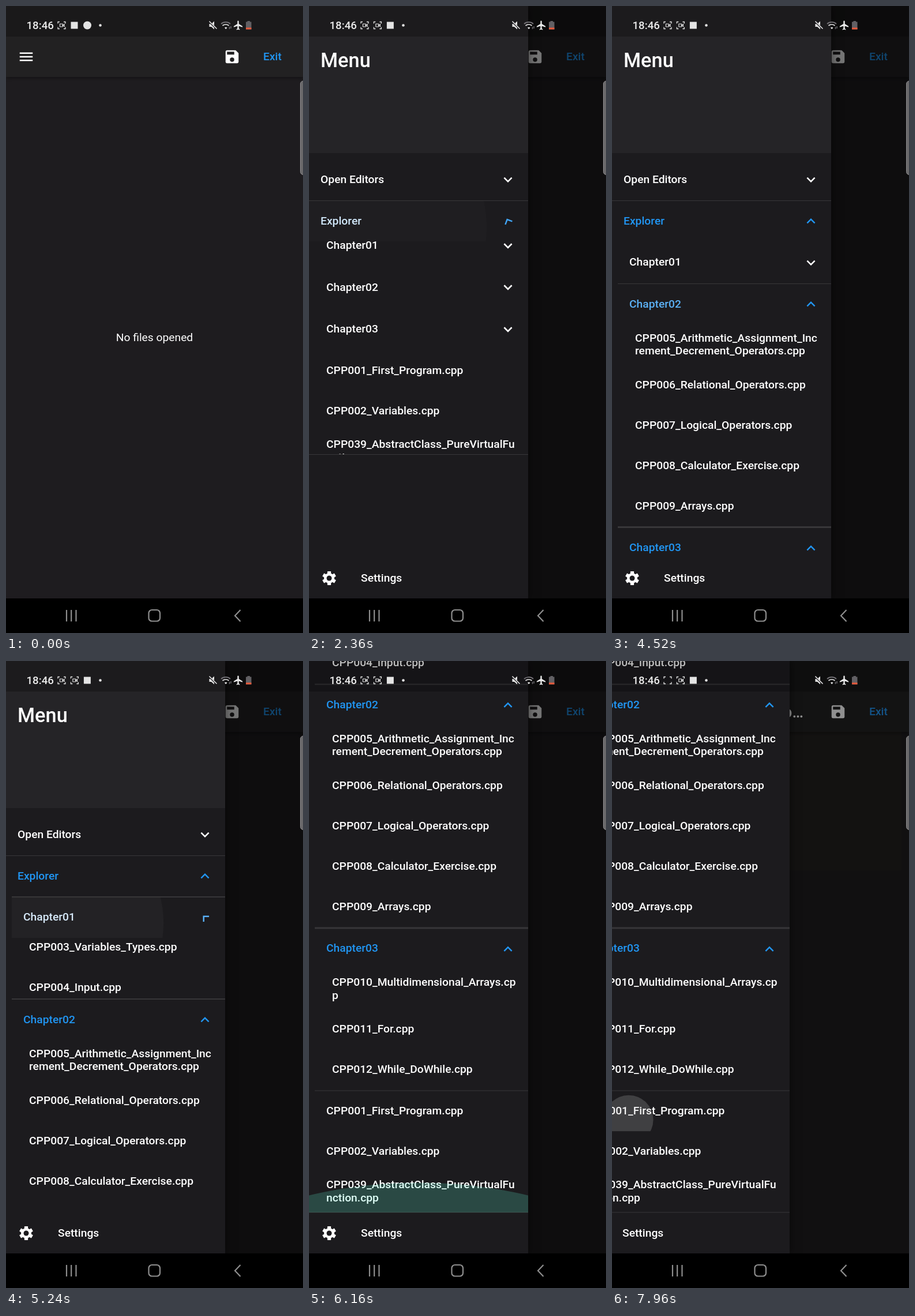
Write an HTML page that moves like this. It is 515x1087 px and loops after 8 s.

```html
<!DOCTYPE html>
<html lang="en">
<head>
<meta charset="utf-8">
<title>File drawer</title>
<style>
html, body { margin: 0; width: 100%; height: 100%; overflow: hidden; background: #000; }
#stage {
  position: relative; width: 515px; height: 1087px; overflow: hidden;
  background: #1e1c1f; color: #fff;
  font: 500 19.25px/22.5px Roboto, sans-serif; white-space: nowrap;
}
#stage div, #stage > svg { position: absolute; }
#stage svg { display: block; }
.icon { width: 30px; height: 30px; fill: currentColor; }

#bar { left: 0; top: 0; width: 515px; height: 123px; background: #222122; box-shadow: 0 2px 6px rgba(0,0,0,.4); }
#bar .icon { position: absolute; top: 73px; }
#exit { left: 446px; top: 77px; color: #2196f3; }
#title { left: 90px; top: 72px; font-size: 27.5px; line-height: 33px; }
#empty { left: 0; width: 515px; top: 564px; text-align: center; font-weight: 400; }
#editor { left: 0; top: 123px; width: 502px; height: 240px; background: #22201e; }
#scrim { left: 0; top: 0; width: 515px; height: 1027px; background: #000; }

#drawer { left: 0; top: 0; width: 380px; height: 1027px; background: #1c1b1e; box-shadow: 0 0 16px rgba(0,0,0,.5); }
#view { left: 0; top: 0; width: 380px; height: 956.5px; overflow: hidden; }
#list { left: 0; top: 0; width: 380px; }
#stage #list div { position: relative; }
#stage #list .head { height: 254.6px; margin-bottom: 10px; background: #252427; }
#stage #list .menu { top: 73.5px; left: 20px; font-size: 34.375px; line-height: 40px; }
#list .row { height: 70px; padding: 0 20px; box-sizing: border-box; overflow: hidden; display: flex; align-items: center; justify-content: space-between; }
#list .line { height: 1.25px; background: rgba(255,255,255,.12); opacity: 0; }
#list .clip { overflow: hidden; }
#list .kids { margin-left: 10px; display: flow-root; }
#stage #list .splash { position: absolute; inset: 0; background: #ccc; opacity: 0; }
#glow { left: 0; bottom: 0; width: 380px; height: 76.4px; overflow: hidden; transform-origin: 50% 100%; }
#glow div { left: -380px; top: 0; width: 1140px; height: 1140px; border-radius: 50%; background: #64ffda; }
#settings { left: 20px; top: 957px; height: 70px; display: flex; align-items: center; gap: 40px; }
#system { left: 0; top: 0; }
</style>
</head>
<body>
<div id="stage">
  <div id="editor"></div>
  <div id="empty">No files opened</div>
  <div id="bar">
    <svg class="icon" style="left:20px" viewBox="0 0 24 24"><path d="M3 18h18v-2H3zM3 13h18v-2H3zM3 6v2h18V6z"/></svg>
    <div id="title">CPP001_First_Pro…</div>
    <svg class="icon" style="left:377px" viewBox="0 0 24 24"><path d="M17 3H5c-1.1 0-2 .9-2 2v14c0 1.1.9 2 2 2h14c1.1 0 2-.9 2-2V7zM12 19a3 3 0 1 1 0-6 3 3 0 0 1 0 6zM15 9H5V5h10z"/></svg>
    <div id="exit">Exit</div>
  </div>
  <div id="scrim"></div>

  <div id="drawer">
    <div id="view">
      <div id="list"><div class="head"><div class="menu">Menu</div></div></div>
      <div id="glow"><div></div></div>
    </div>
    <div id="settings">
      <svg class="icon" viewBox="0 0 24 24">
        <defs><rect id="tooth" x="9.5" y="2.4" width="5" height="19.2" rx=".6"/></defs>
        <use href="#tooth"/><use href="#tooth" transform="rotate(60 12 12)"/><use href="#tooth" transform="rotate(120 12 12)"/>
        <circle cx="12" cy="12" r="7.2"/><circle cx="12" cy="12" r="3.6" fill="#1c1b1e"/>
      </svg>
      <span>Settings</span>
    </div>
  </div>

  <svg id="system" width="515" height="1087" fill="none">
    <defs>
      <path id="frame" d="M90 30.500v-3h3M100 27.500h3v3M103 36.500v3h-3M93 39.500h-3v-3" stroke="#e4e4e4" stroke-width="1.300"/>
      <path id="lens" d="M93.500 31h4.500v5h-4.500zM98 33.500l3-2v4z" stroke="#e4e4e4" stroke-width="1.200"/>
    </defs>
    <rect width="515" height="53" fill="#000" fill-opacity=".25"/>
    <text x="35.500" y="40" font-family="Roboto, sans-serif" font-size="18.700" fill="#ececec">18:46</text>
    <g id="fresh"><use href="#frame"/><use id="blink" href="#lens"/></g>
    <g id="older">
      <use href="#frame"/><use href="#lens"/>
      <rect x="112.500" y="27.500" width="12" height="12" fill="#e4e4e4"/>
    </g>
    <circle id="gone" cx="141" cy="33.500" r="7" fill="#e4e4e4"/>
    <circle cx="163.500" cy="33.500" r="2.300" fill="#e4e4e4"/>
    <g fill="#ececec">
      <path d="M352.500 31v5h3.500l5 4.500v-14l-5 4.500z"/>
      <path d="M352 27l14 13.500" stroke="#18171a" stroke-width="3"/>
      <path d="M352.500 26.500l13 13" stroke="#ececec" stroke-width="1.500"/>
      <path d="M379 37.500a4 4 0 0 1 4.500 0l-2.300 2.800z"/>
      <path transform="translate(393.300 23.900) scale(.8)" d="M21 16v-2l-8-5V3.500a1.500 1.500 0 0 0-3 0V9l-8 5v2l8-2.500V19l-2 1.500V22l3.500-1 3.500 1v-1.500L13 19v-5.500z"/>
    </g>
    <path d="M373 31a12 12 0 0 1 16 0" stroke="#77757a" stroke-width="1.700"/>
    <path d="M375.500 34a8.500 8.500 0 0 1 11 0" stroke="#e4e4e4" stroke-width="1.700"/>
    <path d="M387.500 36v4M390 35v4" stroke="#77757a" stroke-width="1.300"/>
    <path d="M418.500 26h4.500v1.500h2.500v13h-9.500v-13h2.500z" fill="#626064"/>
    <path d="M416 37.500h9.500v3h-9.500z" fill="#e8593a"/>

    <rect x="510.500" y="130" width="14" height="162.500" rx="5" fill="#69686a" stroke="#8b8a8c"/>
    <rect y="1027" width="515" height="60" fill="#000"/>
    <g stroke="#8e8e8e" stroke-width="2.200">
      <path d="M105 1047v20M113.200 1047v20M121.500 1047v20"/>
      <rect x="247.500" y="1047" width="19.500" height="19.500" rx="5.500"/>
      <path d="M406.500 1047l-9.500 10 9.500 10"/>
    </g>
  </svg>
</div>

<script>
const LOOP = 8000, STEP = 40, WIDTH = 380, MAX_SCROLL = 580.6;
const $ = id => document.getElementById(id);
const clamp = x => Math.min(1, Math.max(0, x));
const mix = p => `rgb(${255 - 222 * p},${255 - 105 * p},${255 - 12 * p})`; // white to accent blue
const tiles = [], splashes = [];

function add(parent, cls, html = '') {
  const el = document.createElement('div');
  el.className = cls;
  el.innerHTML = html;
  return parent.appendChild(el);
}

// x and y are the tap point within the row
function addSplash(row, at, x, y = 45) {
  splashes.push({ el: add(row, 'splash'), at, x, y });
}

function addFile(parent, name, tap) {
  const row = add(parent, 'row', `<span>${name.replace('|', '<br>')}</span>`);
  if (tap) addSplash(row, tap, 91, 50);
}

function addTile(parent, name, at, tapX) {
  const box = add(parent, 'tile');
  const top = add(box, 'line');
  const row = add(box, 'row', `<span>${name}</span>
    <svg class="icon" viewBox="0 0 24 24"><path d="M16.590 8.590L12 13.170 7.410 8.590 6 10l6 6 6-6z"/></svg>`);
  const clip = add(box, 'clip'), kids = add(clip, 'kids');
  tiles.push({ at, clip, kids, lines: [top, add(box, 'line')], label: row.children[0], arrow: row.children[1] });
  if (at < LOOP) addSplash(row, at, tapX);
  return kids;
}

addTile($('list'), 'Open Editors', Infinity);
const explorer = addTile($('list'), 'Explorer', 2177, 103);
const chapters = [
  ['Chapter01', 5072, 75, 'CPP003_Variables_Types', 'CPP004_Input'],
  ['Chapter02', 4176, 90, 'CPP005_Arithmetic_Assignment_Inc|rement_Decrement_Operators', 'CPP006_Relational_Operators',
    'CPP007_Logical_Operators', 'CPP008_Calculator_Exercise', 'CPP009_Arrays'],
  ['Chapter03', 3330, 90, 'CPP010_Multidimensional_Arrays.cp|p', 'CPP011_For', 'CPP012_While_DoWhile'],
];
for (const [name, at, tapX, ...files] of chapters) {
  const kids = addTile(explorer, name, at, tapX);
  for (const f of files) addFile(kids, f.endsWith('|p') ? f : f + '.cpp');
}
addFile(explorer, 'CPP001_First_Program.cpp', 7922);
addFile(explorer, 'CPP002_Variables.cpp');
addFile(explorer, 'CPP039_AbstractClass_PureVirtualFu|nction.cpp');

// cubic-bezier(.42, 0, 1, 1)
function easeIn(x) {
  let lo = 0, hi = 1;
  for (let i = 0; i < 20; i++) {
    const s = (lo + hi) / 2, r = 1 - s;
    if (1.26 * r * r * s + 3 * r * s * s + s ** 3 < x) lo = s; else hi = s;
  }
  return lo * lo * (3 - 2 * lo);
}

function drawTile({ at, clip, kids, lines, label, arrow }, t) {
  const dt = t - at, p = clamp(dt / 200);
  const f = p === 0 || p === 1 ? p : easeIn(p);
  const h = f < 1 ? kids.getBoundingClientRect().height : 0;
  clip.style.height = f < 1 ? f * h + 'px' : 'auto';
  kids.style.transform = `translateY(${(f - 1) * h / 2}px)`;
  for (const line of lines) line.style.opacity = 1 - (1 - p) ** 2;
  label.style.color = mix(clamp(dt / 400) ** 2);
  arrow.style.color = mix(f);
  arrow.style.transform = `rotate(${180 * f}deg)`;
}

function drawSplash({ el, at, x, y }, t) {
  const dt = t - at, live = dt > 0 && dt < 200;
  el.style.opacity = live ? .25 * (1 - dt / 200) : 0;
  el.style.clipPath = `circle(${live ? 1.12 * dt : 0}px at ${x}px ${y}px)`;
}

// critically damped spring
function drawerOpen(t) {
  if (t < 1240) return 0;
  if (t >= 7960) return 308 / WIDTH;
  if (t >= 1560) return 1;
  const s = (t - 1220) / 1000, w = Math.sqrt(500);
  return 1 - (1 + (w - 1) * s) * Math.exp(-w * s);
}

function scrollAt(t) {
  const dt = Math.max(0, t - 5620), v = 1.55, ramp = 126;
  return Math.min(MAX_SCROLL, dt < ramp ? v * dt * dt / (2 * ramp) : v * (dt - ramp / 2));
}

function glowAt(t) {
  return t < 6200 ? 1 - (1 - clamp((t - 6058) / 142)) ** 2 : (1 - clamp((t - 6200) / 500)) ** 2;
}

function draw(t) {
  const open = drawerOpen(t), glow = glowAt(t), chosen = t >= 7960;
  $('drawer').style.transform = `translateX(${(open - 1) * WIDTH}px)`;
  $('drawer').style.visibility = open ? 'visible' : 'hidden';
  $('scrim').style.opacity = .54 * open;
  $('empty').hidden = chosen;
  $('title').hidden = $('editor').hidden = !chosen;

  tiles.forEach(x => drawTile(x, t));
  splashes.forEach(x => drawSplash(x, t));
  $('list').style.transform = `translateY(${-scrollAt(t)}px)`;
  $('glow').style.transform = `scaleY(${.74 * glow})`;
  $('glow').style.opacity = .217 * glow;

  const p = clamp((t - 20) / 300), shift = p * p * (3 - 2 * p);
  $('fresh').setAttribute('opacity', shift);
  $('older').setAttribute('transform', `translate(${22.4 * shift} 0)`);
  $('gone').setAttribute('opacity', 1 - shift);
  const lit = Math.floor((t - 550) / 502) % 2 !== 0;
  $('blink').setAttribute('opacity', lit ? 1 : 0);
}

const start = performance.now();
function tick() {
  const t = (performance.now() - start) % LOOP;
  draw(Math.floor(t / STEP) * STEP);
  requestAnimationFrame(tick);
}
tick();
</script>
</body>
</html>
```
